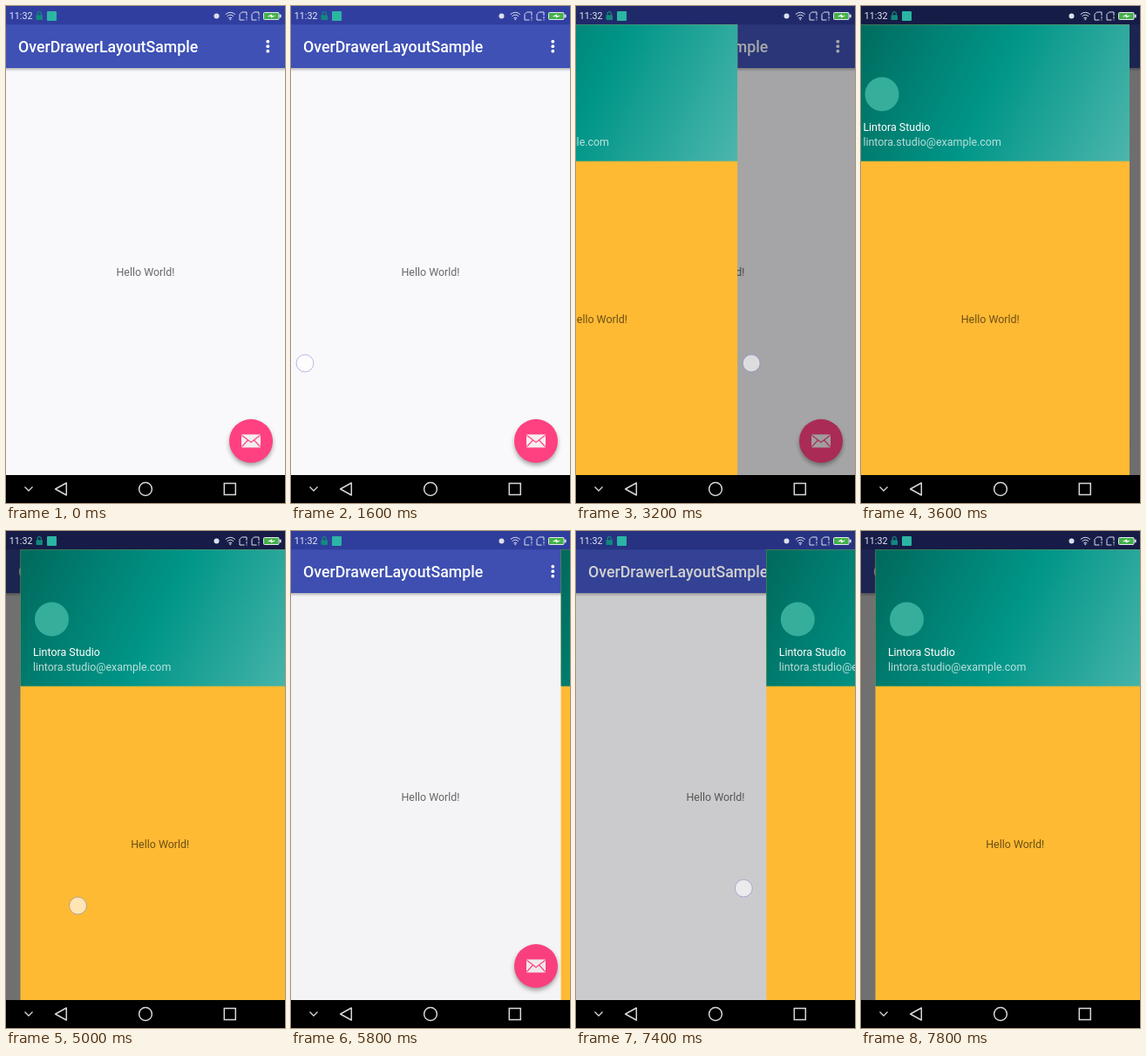
These frames come from a looping animation (320 px wide and 569 px high, 8000 ms). An HTML page:

```html
<!DOCTYPE html>
<html lang="en">
<head>
<meta charset="utf-8">
<title>Drawer demo</title>
<style>
  html, body { margin: 0; width: 100%; height: 100%; overflow: hidden; background: #000; }
  svg { display: block; width: 320px; height: 569px; font-family: Roboto, sans-serif; }
  .title { font-size: 17.78px; font-weight: 500; fill: #fff; }
  .body { font-size: 12.44px; }
  .hello { text-anchor: middle; fill: #000; fill-opacity: .58; }
  .clock { font-size: 10.7px; fill: #e8eaf6; }
  .line { fill: none; stroke: #dcdfee; stroke-width: 1; }
  .nav { fill: none; stroke: #d6d6d6; stroke-width: 1.5; }
</style>
</head>
<body>
<svg viewBox="0 0 320 569">
  <defs>
    <linearGradient id="teal" gradientUnits="userSpaceOnUse" x1="0" y1="21" x2="320" y2="178">
      <stop offset="0" stop-color="#00695c"/>
      <stop offset=".5" stop-color="#009688"/>
      <stop offset="1" stop-color="#4db6ac"/>
    </linearGradient>
    <linearGradient id="barShade" x2="0" y2="1">
      <stop offset="0" stop-opacity=".26"/>
      <stop offset="1" stop-opacity="0"/>
    </linearGradient>
    <filter id="soft" x="-30%" y="-30%" width="160%" height="160%">
      <feGaussianBlur stdDeviation="2.4"/>
    </filter>
    <g id="panel">
      <rect y="21.3" width="320" height="515.7" fill="#ffba33"/>
      <rect y="21.3" width="320" height="156.4" fill="url(#teal)"/>
      <circle cx="36" cy="101" r="19.5" fill="#35ae9c"/>
      <g class="body" fill="#fff">
        <text x="14.4" y="143">Lintora Studio</text>
        <text x="14.4" y="160" fill-opacity=".72">lintora.studio@example.com</text>
      </g>
      <text class="body hello" x="160.3" y="362.5">Hello World!</text>
    </g>
    <path id="sim" class="line" d="M8.5 4.5V.5H3L.5 3V9.5H6M8.5 5.5V8M8.5 9V10"/>
  </defs>

  <!-- main screen -->
  <rect width="320" height="537" fill="#f9f9fb"/>
  <rect y="71" width="320" height="4" fill="url(#barShade)"/>
  <rect width="320" height="71" fill="#3f51b5"/>
  <rect width="320" height="21.3" fill="#303f9f"/>
  <text class="title" x="14" y="53.3">OverDrawerLayoutSample</text>
  <g fill="#fff">
    <circle cx="300.3" cy="40.7" r="1.9"/>
    <circle cx="300.3" cy="46.2" r="1.9"/>
    <circle cx="300.3" cy="51.7" r="1.9"/>
  </g>
  <text class="body hello" x="160" y="309">Hello World!</text>
  <circle cx="281" cy="501" r="25" fill-opacity=".35" filter="url(#soft)"/>
  <circle cx="281" cy="498" r="25" fill="#ff4081"/>
  <rect x="270" y="490.5" width="22" height="15" rx="1" fill="#f3eef0"/>
  <path d="M270.5 491.5L281 499.5L291.5 491.5M270.5 504.5L277.5 497M291.5 504.5L284.5 497" fill="none" stroke="#ff4081" stroke-width="1.1"/>

  <rect id="scrim" width="320" height="537" opacity="0"/>
  <use id="left" href="#panel"/>
  <use id="right" href="#panel"/>

  <!-- status icons -->
  <text class="clock" x="3.8" y="15">11:32</text>
  <g fill="#12897c">
    <rect x="34.5" y="10.2" width="7.5" height="5.8" rx=".8"/>
    <path d="M36.2 10.5V8.6A2 2 0 0 1 40.3 8.6V10.5" fill="none" stroke="#12897c" stroke-width="1.2"/>
    <rect x="47" y="6" width="11" height="11" rx="1" fill="#2bb5a3"/>
  </g>
  <circle cx="241.5" cy="11.5" r="3" fill="#dcdfee"/>
  <g class="line">
    <path d="M251.8 9.6Q257.3 5 262.8 9.6M253.6 11.8Q257.3 8.6 261 11.8M255.4 13.9Q257.3 12.3 259.2 13.9"/>
    <circle cx="257.3" cy="15.2" r=".6"/>
  </g>
  <use href="#sim" x="267.5" y="6.5"/>
  <use href="#sim" x="281.5" y="6.5"/>
  <rect x="295.5" y="7.5" width="17.5" height="8" rx="1" fill="#43b04a" stroke="#e3e6f0"/>
  <rect x="313.6" y="9.7" width="2" height="3.6" fill="#e3e6f0"/>
  <path d="M299.5 12.3L305.3 9.2L304.8 11.2L309.5 10.7L303.7 13.8L304.2 11.9Z" fill="#fff"/>

  <circle id="touch" r="9.9" fill="#fff" fill-opacity=".62" stroke="#7b74c8" stroke-opacity=".5"/>

  <!-- navigation bar -->
  <rect y="537" width="320" height="32"/>
  <g class="nav">
    <path d="M21.5 550.5L26 555L30.5 550.5" stroke-width="1.3"/>
    <path d="M69.3 546V560L56.6 553Z" stroke-linejoin="round"/>
    <circle cx="160" cy="553" r="7.4"/>
    <rect x="250.3" y="546.5" width="13" height="13"/>
  </g>
</svg>
<script>
  const LOOP = 8000, STEP = 200, WIDTH = 320, RELEASE = .88;

  // reach: drawer width when open; grip: finger distance from the drawer edge
  const leftSide = { sign: 1, reach: 308, grip: 16 };
  const rightSide = { sign: -1, reach: 303.5, grip: 26 };
  const swipes = [
    { side: leftSide, opens: true, start: 1600, end: 3600 },
    { side: leftSide, opens: false, start: 3800, end: 4400 },
    { side: rightSide, opens: true, start: 4400, end: 5000 },
    { side: rightSide, opens: false, start: 5000, end: 5900 },
    { side: rightSide, opens: true, start: 6750, end: 7800 }
  ];

  const drag = p => p ** 2.28;
  const smooth = p => p * p * (3 - 2 * p);

  const [scrim, left, right, touch] =
    ["scrim", "left", "right", "touch"].map(id => document.getElementById(id));

  function pose(t) {
    const swipe = swipes.findLast(s => s.start <= t);
    if (!swipe) return { open: 0, x: 0, y: 0, held: false };
    const { side, opens, start, end } = swipe;
    const p = Math.min((t - start) / (end - start), 1);
    const open = side.sign * side.reach * (opens ? drag(p) : 1 - smooth(p));
    const edge = side.sign > 0 ? open : WIDTH + open;
    const grip = opens ? side.grip : -66;
    return { open, x: edge + side.sign * grip, y: opens ? 409 : 429, held: p < RELEASE };
  }

  function draw(now) {
    const { open, x, y, held } = pose(Math.floor(now % LOOP / STEP) * STEP);
    const move = (el, x, y = 0) => el.setAttribute("transform", `translate(${x} ${y})`);
    move(left, Math.max(open, 0) - WIDTH);
    move(right, WIDTH + Math.min(open, 0));
    move(touch, x, y);
    touch.setAttribute("opacity", held ? 1 : 0);
    scrim.setAttribute("opacity", Math.abs(open) / WIDTH * .58);
  }

  const start = performance.now();
  function tick() {
    draw(performance.now() - start);
    requestAnimationFrame(tick);
  }
  tick();
</script>
</body>
</html>
```
